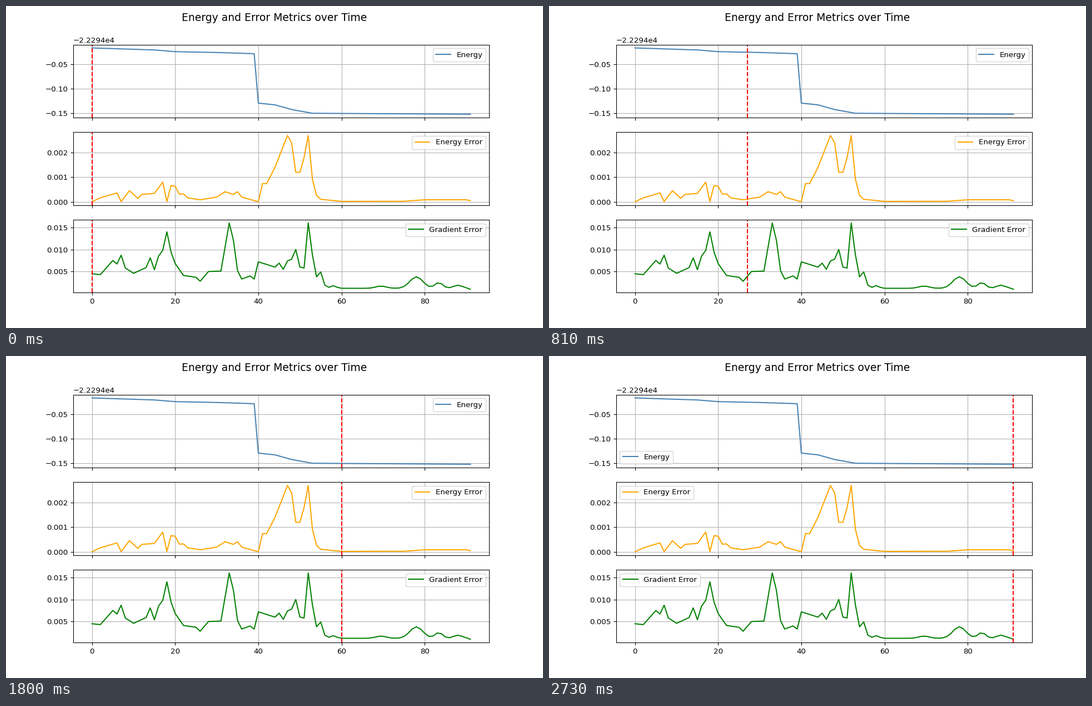
Animation, 966 px wide and 580 px high, one loop 2760 ms. Source, as a matplotlib script:

```python
import numpy as np
import matplotlib.pyplot as plt
from matplotlib.animation import FuncAnimation

WIDTH, HEIGHT, DPI = 966, 580, 96.6
STEPS = 92
steps = np.arange(STEPS)


def trace(*points):
    """Straight segments through (step, value) key points."""
    return np.interp(steps, *zip(*points))


def bump(center, height, width):
    return height * np.exp(-((steps - center) / width) ** 2)


# Slow descent, one sharp drop, then convergence
energy = -22294 + 1e-3 * trace(
    (0, -16.5), (15, -20.6), (20, -24.1), (30, -25.8), (39, -28.3),
    (40, -129.7), (44, -133.2), (48, -142.8), (53, -150.5), (91, -152.5))

energy_error = 1e-5 * trace(
    (0, 0), (2, 16), (6, 36), (7, 1), (9, 45), (11, 14), (12, 30), (15, 34),
    (17, 80), (18, 1), (19, 66), (20, 63), (21, 31), (22, 32), (23, 16),
    (26, 8), (30, 19), (32, 41), (34, 30), (35, 41), (36, 19), (40, 0),
    (41, 74), (42, 74), (44, 140), (47, 270), (48, 240), (49, 120),
    (50, 120), (51, 180), (52, 270), (53, 92), (54, 26), (55, 10),
    (60, 1.5), (75, 2), (80, 8), (90, 8), (91, 4.5))

gradient_error = 1e-3 * (
    trace(
        (0, 4.5), (2, 4.3), (5, 7.5), (6, 6.7), (7, 8.7), (8, 5.8),
        (10, 4.6), (13, 5.9), (14, 8.1), (15, 5.4), (16, 8.5), (17, 9.8),
        (18, 14), (19, 9.4), (20, 6.8), (22, 4.1), (25, 3.7), (26, 2.8),
        (28, 5), (31, 5.1), (33, 16), (34, 12.1), (35, 5.2), (36, 3.3),
        (38, 4), (39, 3.3), (40, 7.2), (44, 6), (45, 6.9), (46, 5.5),
        (47, 7.4), (48, 7.8), (49, 10), (50, 6), (51, 5.8), (52, 16),
        (53, 8.8), (54, 3.8), (55, 4.9), (56, 1.9), (57, 1.2), (90, 1.2),
        (91, 0.97))
    + bump(58, 0.6, 1) + bump(69.5, 0.5, 1.8) + bump(78, 2.6, 2.2)
    + bump(83.4, 1.3, 1.3) + bump(88, 0.7, 1.5))

# The small margin keeps the canvas from rounding down a pixel
fig, axes = plt.subplots(
    3, 1, sharex=True, dpi=DPI,
    figsize=((WIDTH + 0.01) / DPI, (HEIGHT + 0.01) / DPI))
fig.suptitle("Energy and Error Metrics over Time", fontsize=14)

series = [
    (energy, "steelblue", "Energy"),
    (energy_error, "orange", "Energy Error"),
    (gradient_error, "green", "Gradient Error"),
]
cursors = []
for ax, (values, color, label) in zip(axes, series):
    ax.plot(steps, values, color=color, label=label)
    cursors.append(ax.axvline(0, color="red", linestyle="--"))
    ax.grid(True)
    # "best" moves the legend away once the cursor reaches it
    ax.legend(loc="best")


def update(step):
    for cursor in cursors:
        cursor.set_xdata([step, step])
    return cursors


anim = FuncAnimation(fig, update, frames=STEPS, interval=30,
                     repeat=True, repeat_delay=0, blit=False)
plt.show()
```
